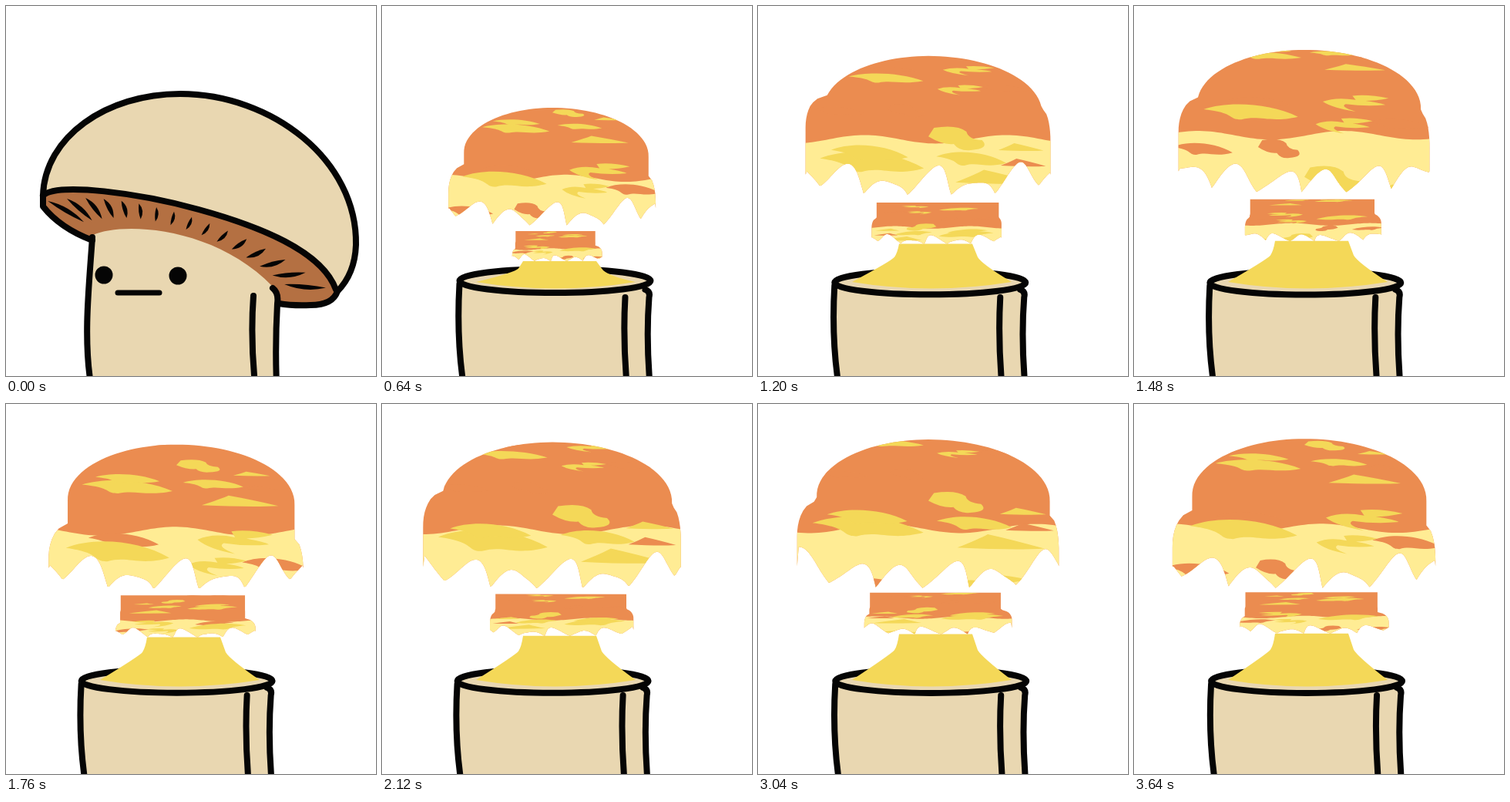
An HTML page with a canvas that plays this animation: 480x480 px, repeating every 3680 ms.

```html
<!DOCTYPE html>
<html>
<head>
<meta charset="utf-8">
<style>
html, body { margin: 0; width: 100%; height: 100%; overflow: hidden; background: #fff; }
canvas { display: block; width: 100%; height: 100%; }
</style>
</head>
<body>
<canvas width="480" height="480"></canvas>
<script>
const ctx = document.querySelector('canvas').getContext('2d');
const LOOP = 3680, STEP = 40, ROLL = 1000, BLAST = 480, TAU = 2 * Math.PI;
const TAN = '#e9d7b1', BROWN = '#b47042', ORANGE = '#eb8c50', YELLOW = '#f4d858', PALE = '#ffec94', INK = '#050505';
const { sin, cos, abs, min, max, sqrt, PI } = Math;
const lerp = (a, b, k) => a + (b - a) * k;
const bezier = (a, b, c, d, k) => lerp(lerp(lerp(a, b, k), lerp(b, c, k), k), lerp(lerp(b, c, k), lerp(c, d, k), k), k);
// Quarter circle from 0 to 1, then flat
const round = k => sqrt(1 - (1 - min(max(k, 0), 1)) ** 2);

function fill(d, color) {
  ctx.fillStyle = color;
  ctx.fill(new Path2D(d));
}
function line(d, width = 8) {
  ctx.strokeStyle = INK;
  ctx.lineWidth = width;
  ctx.lineCap = ctx.lineJoin = 'round';
  ctx.stroke(new Path2D(d));
}
function at(x, y, sx, sy, paint, turn = 0) {
  ctx.save();
  ctx.translate(x, y);
  ctx.rotate(turn);
  ctx.scale(sx, sy);
  paint();
  ctx.restore();
}

// Leaves fan out along the underside, longest at both ends
function gills() {
  for (let i = 0; i < 16; i++) {
    const k = i / 15, length = 9 + 18 * abs(2 * k - 1) ** 2.5;
    const x = bezier(78, 165, 285, 388, k), y = bezier(266, 250, 283, 364, k);
    at(x, y, length, min(5, length * .4), () => fill('M-1 0Q0 -1.6 1 .3Q0 .8 -1 0', INK), lerp(.5, 3.2, k));
  }
}

function mushroom(sx, sy, cy) {
  const rim = 'C65 228 175 243 250 264C330 286 410 318 428 368';
  const dome = 'M48 246C50 170 130 114 226 114C345 114 456 200 454 310C453 335 445 355 430 370';
  at(250, cy, sx, sy, () => {
    ctx.translate(-250, -cy);
    fill('M48 246' + rim + 'Q432 388 395 388L350 386L112 304Q70 288 48 260Z', BROWN);
    gills();
    fill('M113 297C150 280 270 285 346 364Q354 372 352 386Q349 440 351 500L112 500C100 440 107 360 113 297Z', TAN);
    fill(dome + 'L428 368C410 318 330 286 250 264C175 243 65 228 48 246Z', TAN);
    line(dome);
    line('M48 246' + rim);
    line('M48 246L48 260Q70 288 112 304M430 370Q424 388 395 388Q372 389 354 386');
    line('M112 300C108 360 100 430 110 490M346 366Q354 372 352 386Q349 440 351 490M321 376Q317 430 323 490');
    line('M145 372H199', 7);
    line('M127 349h0M223 350h0', 23);
  });
}

// Half circle-like dome above two shoulders; a flat cloud starts below the dome
function side(depth, notch, width, flare) {
  return width * round(depth / (width / 2)) + flare * round((depth - notch) / 45);
}
function outline(phase, flat) {
  const path = new Path2D(), notch = 80 + 30 * cos(TAU * (phase - .8)), end = 168;
  const level = d => flat ? max(d, 70) : d;
  for (let i = -40; i <= 40; i++) {
    const d = end * (i / 40) ** 2;
    path.lineTo(i < 0 ? -side(level(d), notch, 148, 26) : side(level(d), notch + 20, 161, 12), d);
  }
  for (let x = 172; x > -173; x -= 2) {
    const s = x / 62 + .5 * sin(TAU * phase);
    const gap = 42 * abs(sin(PI * s)) * (.4 + .6 * sin(1.7 * s + PI * phase) ** 2);
    path.lineTo(x + gap * .3 * (1 - (x / 173) ** 2), 197 - 20 * (x / 173) ** 4 - gap);
  }
  path.closePath();
  return path;
}

const streak = { ratio: .3, path: new Path2D('M-1 -.3C-.5 -1.2 .4 -1 1 .5C.4 1.2 .2 .3 -.2 .8C-.5 .8 -.3 .1 -1 -.3') };
const blob = { ratio: .6, path: new Path2D('M-1 -.2L-.8 -.9Q0 -1.2 .35 -.6Q.4 0 .9 .1Q1.2 .8 .5 .9Q.1 1 -.1 .4Q-.5 .5 -1 -.2') };
const zig = { ratio: .4, path: new Path2D('M-1 -.2Q-.6 -.8 0 -.4L-.1 -.9Q.4 -1.1 1 -.6Q.6 -.3 .3 -.3Q.8 0 .9 .2Q.3 .4 -.3 .1Q-.5 .4 0 1Q-.7 .6 -1 -.2') };
const wedge = { ratio: .28, path: new Path2D('M-1 .4Q-.5 -.5 -.3 -1Q.3 -.4 1 .5Q.3 .7 -1 .4') };

// shape, x, moment of birth in the roll, half width
const yellows = [
  [blob, 25, .57, 25], [zig, 35, .91, 25], [wedge, 60, .315, 36], [streak, 38, .44, 31], [wedge, 82, .51, 20],
  [streak, -50, .42, 46], [streak, -52, .48, 34], [zig, 50, .06, 32], [streak, -50, 0, 44]
];
const oranges = [[wedge, 84, .41, 20], [streak, 84, .92, 28], [blob, -22, .76, 18], [streak, -88, .76, 26], [streak, -45, .07, 30]];

// Each patch rolls from the crown to the hem, growing as it turns to the front
function patches(list, color, phase) {
  ctx.fillStyle = color;
  for (const [{ ratio, path }, x, birth, w] of list) {
    const age = (phase - birth + 2) % 1, spread = 1 + min(age, .6);
    at(x * spread, 200 * age ** 1.15, w * spread, w * ratio * (.35 + 1.3 * min(age, .7)), () => ctx.fill(path));
  }
}

function cloud(x, y, sx, sy, phase, flat) {
  at(x, y, sx, sy, () => {
    ctx.clip(outline(phase, flat));
    ctx.fillStyle = ORANGE;
    ctx.fillRect(-230, -20, 460, 280);
    ctx.fillStyle = PALE;
    ctx.beginPath();
    for (let px = -200; px <= 200; px += 5) ctx.lineTo(px, 118 + 6 * sin(px / 32 + TAU * phase));
    ctx.lineTo(200, 260);
    ctx.lineTo(-200, 260);
    ctx.fill();
    patches(oranges, ORANGE, phase);
    patches(yellows, YELLOW, phase);
  });
}

function stump(t, rest, top) {
  const cy = 359.5 - 3 * min(rest, 1);
  const rim = `M99 ${cy}A124 15.5 0 0 1 347 ${cy}A124 15.5 0 0 1 99 ${cy}Z`;
  const knee = lerp(top, 358, .35);
  at(1.5 * cos(TAU * (t - 600) / 2700), 0, 1, 1, () => {
    fill(`M99 ${cy}Q95 430 104 500L347 500Q341 430 345 ${cy}Z`, TAN);
    line(`M99 ${cy + 4}Q95 430 104 490M340 368Q347 370 345 378Q341 430 346 490M314 378Q311 430 316 490`);
    fill(rim, TAN);
    line(rim);
  });
  fill(`M183 ${top}Q181 ${knee - 6} 177 ${knee}Q173 ${knee + 5} 122 358Q224 375 329 358Q290 ${knee + 9} 285 ${knee}L278 ${top}Z`, YELLOW);
}

function blast(t) {
  // Part of the rise still to come: fast at first, then a long slow tail
  const rest = (1 + (t - 640) / 550) ** -2, slow = rest ** .7, phase = t % ROLL / ROLL;
  const size = 1 - .225 * slow, ringTop = 243 + 49 * rest, column = 295 + 36 * slow;
  stump(t, rest, column);
  cloud(234 - 7 * slow, ringTop, -.575 * (1 - .415 * slow), (column - ringTop) / 196, phase, true);
  cloud(221, 43 + 89 * rest, size, size, phase, false);
}

function draw(t) {
  ctx.fillStyle = '#fff';
  ctx.fillRect(0, 0, 480, 480);
  if (t >= BLAST) blast(t);
  else if (t >= 400) {
    const swell = t < 440 ? 1.03 : 1.06;
    mushroom(swell, swell, 300);
  } else {
    const squash = t < 80 ? 0 : t < 240 ? 1 : 2;
    mushroom(1 + squash * .0015, 1 - squash * .0045, 480);
  }
}

const start = performance.now();
function tick() {
  const t = (performance.now() - start) % LOOP;
  draw(Math.floor(t / STEP) * STEP);
  requestAnimationFrame(tick);
}
tick();
</script>
</body>
</html>
```
